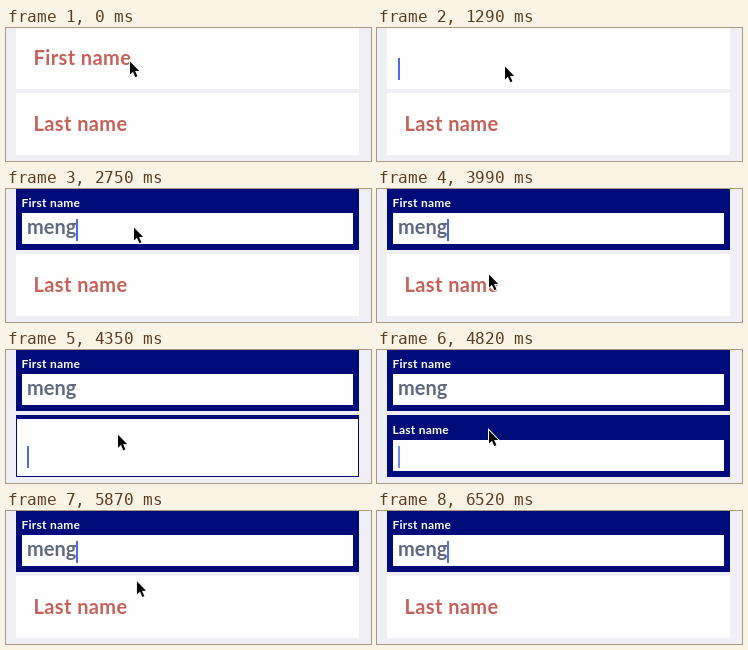
Write an HTML page that moves like this. It is 365x133 px and loops after 6.63 s.

```html
<!DOCTYPE html>
<html lang="en">
<head>
<meta charset="utf-8">
<title>Name form</title>
<style>
  html, body {
    margin: 0;
    width: 100%;
    height: 100%;
    overflow: hidden;
    background: #f0eff6;
  }
  .stage {
    position: relative;
    width: 365px;
    height: 133px;
    overflow: hidden;
    font: 700 20px/20px Lato, "Open Sans", sans-serif;
    white-space: nowrap;
  }
  .stage * { animation: 6630ms linear infinite; }

  .field {
    position: absolute;
    left: 10px;
    width: 343px;
    height: 62px;
    background: #000b7a;
  }
  .first { top: -1px; }
  .last { top: 65px; }
  .box { position: absolute; inset: 0; background: #fefefe; }
  .label {
    position: absolute;
    left: 17.5px;
    top: 20px;
    color: #c5605a;
    letter-spacing: .02em;
  }
  .value { position: absolute; left: 11px; top: 28px; color: #5f6a80; }
  .caret {
    position: absolute;
    width: 2px;
    height: 22px;
    margin-top: 3px;
    background: #4a6cec;
    opacity: 0;
  }
  .cursor { position: absolute; left: 0; top: 0; overflow: visible; }

  /* Labels switch size and colour at once; position and frame ease. */
  .stage .first .box { animation-name: first-box; }
  .stage .first .slide { animation-name: first-slide; }
  .stage .first .label { animation-name: first-label; animation-timing-function: step-end; }
  .stage .first .caret { animation-name: first-caret; }
  .stage .last .box { animation-name: last-box; }
  .stage .last .slide { animation-name: last-slide; }
  .stage .last .label { animation-name: last-label; animation-timing-function: step-end; }
  .stage .last .caret { animation-name: last-caret; }
  .stage .value b { font-size: 0; animation-timing-function: step-end; }
  .stage b:nth-child(1) { animation-name: key1; }
  .stage b:nth-child(2) { animation-name: key2; }
  .stage b:nth-child(3) { animation-name: key3; }
  .stage b:nth-child(4) { animation-name: key4; }
  .stage .cursor { animation-name: point; animation-timing-function: ease-in-out; }

  @keyframes first-box {
    0% { inset: 0; }
    19.83% { inset: 0; animation-timing-function: ease; }
    25.87%, 100% { inset: 25px 6px 6px; }
  }
  @keyframes first-slide {
    0% { transform: none; }
    19.83% { transform: none; animation-timing-function: ease; }
    25.87%, 100% { transform: translate(-12px, -15px); }
  }
  @keyframes first-label {
    0% { font-size: 20px; color: #c5605a; }
    19.45%, 100% { font-size: 12px; color: #fff; }
  }
  @keyframes last-box {
    0%, 100% { inset: 0; }
    64.86% { inset: 0; animation-timing-function: ease; }
    70.89% { inset: 25px 6px 6px; }
    81.03% { inset: 25px 6px 6px; animation-timing-function: ease; }
    87.06% { inset: 0; }
  }
  @keyframes last-slide {
    0%, 100% { transform: none; }
    64.86% { transform: none; animation-timing-function: ease; }
    70.89% { transform: translate(-12px, -15px); }
    81.03% { transform: translate(-12px, -15px); animation-timing-function: ease; }
    87.06% { transform: none; }
  }
  @keyframes last-label {
    0%, 81.03%, 100% { font-size: 20px; color: #c5605a; }
    64.7% { font-size: 12px; color: #fff; }
  }
  @keyframes first-caret {
    0%, 19.44% { opacity: 0; }
    19.45%, 27% { opacity: 1; }
    28.96%, 29.85% { opacity: 0; }
    29.86%, 49.2% { opacity: 1; }
    51.28%, 57.16% { opacity: 0; }
    58.8%, 64.69% { opacity: 1; }
    64.7%, 81.02% { opacity: 0; }
    81.03%, 88.7% { opacity: 1; }
    90.6%, 96.98% { opacity: 0; }
    98.4%, 100% { opacity: 1; }
  }
  @keyframes last-caret {
    0%, 64.69% { opacity: 0; }
    64.7%, 72.25% { opacity: 1; }
    74.5%, 100% { opacity: 0; }
  }
  @keyframes key1 { 0% { font-size: 0; } 29.86%, 100% { font-size: 20px; } }
  @keyframes key2 { 0% { font-size: 0; } 34.23%, 100% { font-size: 20px; } }
  @keyframes key3 { 0% { font-size: 0; } 36.95%, 100% { font-size: 20px; } }
  @keyframes key4 { 0% { font-size: 0; } 41.47%, 100% { font-size: 20px; } }
  @keyframes point {
    0%, 8.6% { transform: translate(124px, 33px); }
    10.5% { transform: translate(145px, 38px); }
    13.12%, 53.3% { transform: translate(128px, 38px); }
    60.1%, 64.7% { transform: translate(112px, 85px); }
    68%, 75.1% { transform: translate(112px, 80px); }
    80.5%, 85.4% { transform: translate(128px, 42.5px); }
    93.82%, 100% { transform: translate(138px, 136px); }
  }
</style>
</head>
<body>
<div class="stage">
  <div class="field first">
    <div class="box"></div>
    <div class="slide"><span class="label">First name</span></div>
    <div class="value"><b>m</b><b>e</b><b>n</b><b>g</b><i class="caret"></i></div>
  </div>
  <div class="field last">
    <div class="box"></div>
    <div class="slide"><span class="label">Last name</span></div>
    <div class="value"><i class="caret"></i></div>
  </div>
  <svg class="cursor" width="12" height="19">
    <path d="M0 .5V13.5L3 10.8L5.4 16.2L7.4 15.3L5.1 10.1H9.2Z"
      fill="#000" stroke="#fff" stroke-width="2" paint-order="stroke"/>
  </svg>
</div>
</body>
</html>
```
